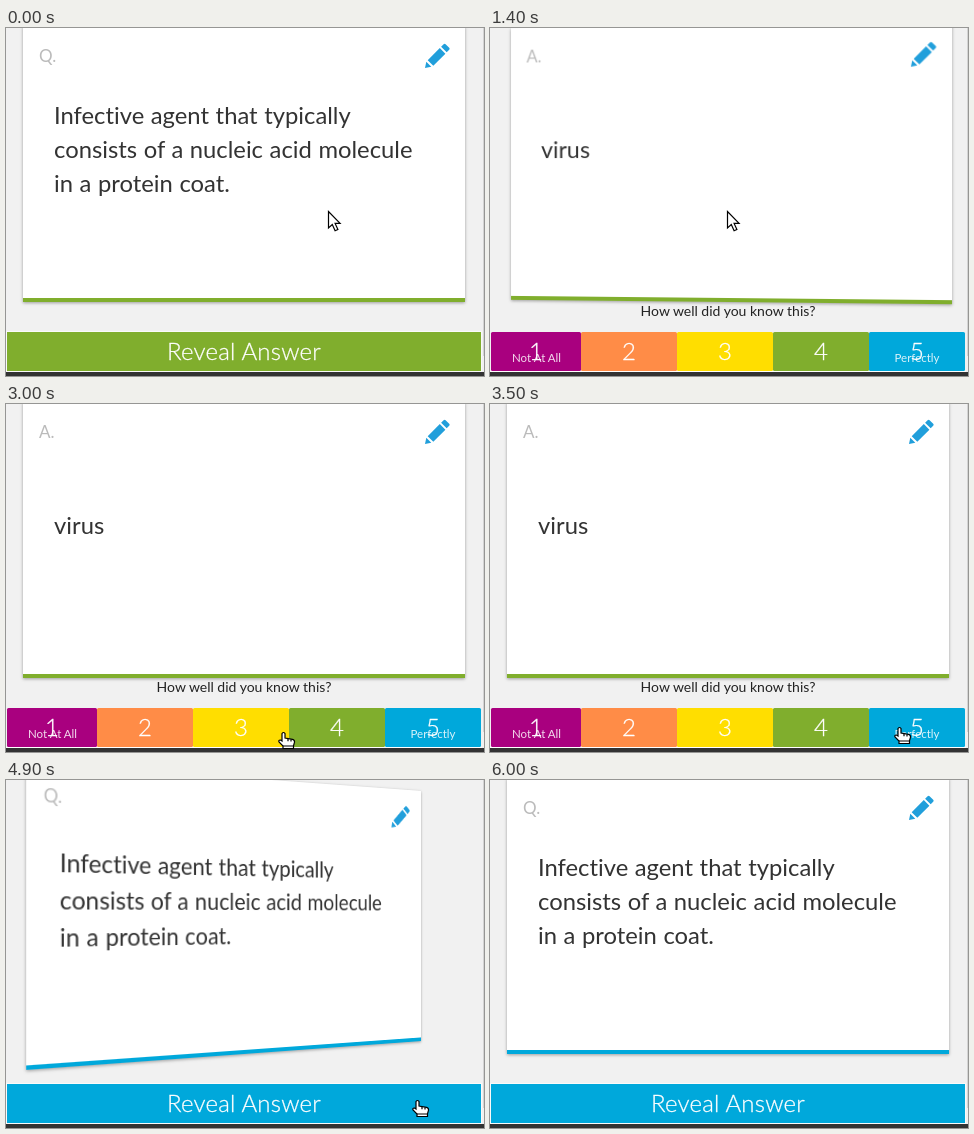
Write an HTML page that moves like this. It is 478 px wide and 348 px high and loops after 7200 ms.

```html
<!DOCTYPE html>
<html lang="en">
<head>
<meta charset="utf-8">
<title>Flashcard</title>
<style>
html, body { margin: 0; width: 100%; height: 100%; overflow: hidden; background: #f1f1f1; }
#stage { position: absolute; left: 0; top: 0; width: 478px; height: 348px; overflow: hidden;
  perspective: 1000px; perspective-origin: 238px 136px; }
svg { position: absolute; left: 0; top: 0; overflow: visible; }
text { font-family: Lato, "Open Sans", sans-serif; font-variant-ligatures: none; fill: #333; }
.face { position: absolute; left: 17px; top: -2px; width: 442px; height: 272px;
  background: #fff; border-bottom: 4px solid #80ae2d; box-shadow: 0 1px 3px rgba(0,0,0,.35); }
.face svg { left: -17px; top: 2px; }
.face text { font-size: 23.8px; word-spacing: .5px; }
.face .tag { font-size: 17px; fill: #bbb; }
#ui .big { font-size: 24px; font-weight: 300; fill: #fff; stroke: #fff; stroke-width: .3; text-anchor: middle; }
#reveal .big { letter-spacing: .2px; }
#ui .small { font-size: 11.5px; fill: #fff; fill-opacity: .85; text-anchor: middle; }
#ui .ask { font-size: 14px; fill: #222; text-anchor: middle; }
#cursor path { fill: #fff; stroke: #000; stroke-width: 1.2; }
</style>
</head>
<body>
<div id="stage">
  <div class="face" id="front">
    <svg width="478" height="348">
      <text class="tag" x="33" y="33.5">Q.</text>
      <text x="48" y="96">Infective agent that typically</text>
      <text x="48" y="130">consists of a nucleic acid molecule</text>
      <text x="48" y="164">in a protein coat.</text>
      <path id="pen" fill="#219fdb" d="M419 40l1.3-6.3 5 5zM421.7 32.2L433.8 20.1l5.6 5.6-12.1 12.1zM435.1 18.7l2.5-2.5q1-1 2 0l3.6 3.6q1 1 0 2l-2.5 2.5z"/>
    </svg>
  </div>
  <div class="face" id="back">
    <svg width="478" height="348">
      <text class="tag" x="33" y="33.5">A.</text>
      <text x="48" y="130">virus</text>
      <use href="#pen"/>
    </svg>
  </div>
  <svg id="ui" width="478" height="348">
    <path d="M477.5 0V328" stroke="#d4d4d4"/>
    <path d="M0 343.5H476" stroke="#fff"/>
    <path d="M0 344H478V348H0z" fill="#333"/>
    <g id="reveal">
      <rect id="bar" x="1" y="304" width="474" height="39"/>
      <path d="M.5 303.5H475.5V343.5H.5z" fill="none" stroke="#fafafa"/>
      <text class="big" x="238" y="331.5">Reveal Answer</text>
    </g>
    <g id="rate">
      <text class="ask" x="238" y="288">How well did you know this?</text>
    </g>
    <g id="cursor">
      <path id="arrow" d="M.5 .5V17l3.8-3.5 2.8 6.2 2.8-1.2-2.8-6.1h5z"/>
      <g id="hand">
        <path d="M-2 1.5q1.5-2 3 0V6l7.5 1.4q2.3.6 2 2.8l-1 3.6v2.7H-1V14l-4-4q-.8-2.3 1.7-1.9l1.3.9z"/>
        <path d="M-1 14H9.5M4 6.8v2.4M7 7.4v2.2"/>
      </g>
    </g>
  </svg>
</div>
<script>
const $ = id => document.getElementById(id);
const GREEN = "#80ae2d", BLUE = "#00a8db", LOOP = 7200, FLIP = 580;

// Rating buttons
let buttons = "";
["#a9007f", "#ff8c47", "#ffde00", GREEN, BLUE].forEach((fill, i) => {
  const x = i ? 96 * i - 5 : 1, mid = i ? 96 * i + 43 : 46;
  buttons += `<rect x="${x}" y="304" width="${i ? 96 : 90}" height="39" rx="1.5" fill="${fill}"/>
    <text class="big" x="${mid}" y="331.5">${i + 1}</text>`;
});
$("rate").innerHTML += buttons +
  '<text class="small" x="46.5" y="334">Not At All</text><text class="small" x="427" y="334">Perfectly</text>';

// Pointer path: time, x, y
const path = [
  [100, 322, 183], [400, 237, 183], [2200, 237, 183], [2300, 237, 182], [2800, 251, 329],
  [2900, 251, 329], [3500, 410, 323], [3700, 413, 322], [4200, 413, 322], [4400, 412, 320],
  [5400, 412, 320], [5500, 418, 300], [5900, 322, 169]
];

function pointer(t) {
  const i = path.findIndex(p => p[0] >= t);
  if (i < 1) return path[i < 0 ? path.length - 1 : 0].slice(1);
  const a = path[i - 1], b = path[i], k = (t - a[0]) / (b[0] - a[0]);
  return [1, 2].map(n => a[n] + (b[n] - a[n]) * k);
}

// cubic-bezier(.25, .1, .25, 1)
function ease(x) {
  if (x <= 0 || x >= 1) return x <= 0 ? 0 : 1;
  const curve = (a, b, u) => 3 * a * u * (1 - u) ** 2 + 3 * b * u * u * (1 - u) + u ** 3;
  let lo = 0, hi = 1;
  for (let i = 0; i < 24; i++) {
    const u = (lo + hi) / 2;
    if (curve(.25, .25, u) < x) lo = u; else hi = u;
  }
  return curve(.1, 1, lo);
}

const show = (id, on) => $(id).style.display = on ? "" : "none";

function draw(t) {
  const angle = 180 * (ease((t - 933) / FLIP) - ease((t - 4583) / FLIP));
  const color = t < 4600 ? GREEN : BLUE, rating = t >= 1000 && t < 4600;
  $("front").style.transform = `rotateY(${angle}deg)`;
  $("back").style.transform = `rotateY(${angle - 180}deg)`;
  $("front").style.borderBottomColor = color;
  $("bar").setAttribute("fill", color);
  show("front", angle < 90);
  show("back", angle >= 90);
  show("rate", rating);
  show("reveal", !rating);

  const [x, y] = pointer(t).map(Math.round);
  $("cursor").setAttribute("transform", `translate(${x} ${y})`);
  show("cursor", t < 6000);
  show("hand", y > 303);
  show("arrow", y <= 303);
}

const start = performance.now();
function tick() {
  const t = (performance.now() - start) % LOOP;
  draw(Math.floor(t / 100) * 100);
  requestAnimationFrame(tick);
}
tick();
</script>
</body>
</html>
```
